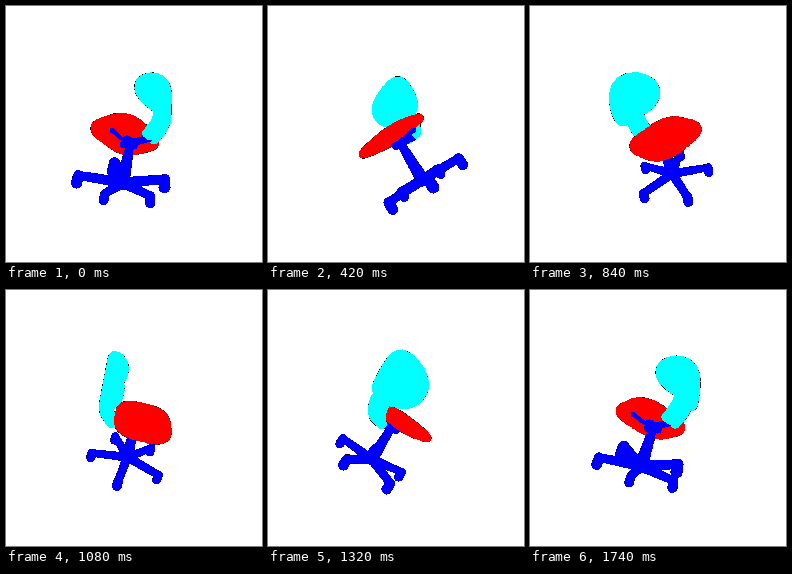
An HTML page with a canvas for the animation above (1.8 s loop, 256x256 px).

```html
<!DOCTYPE html>
<html lang="en">
<head>
<meta charset="utf-8">
<title>Turning chair</title>
<style>
html, body { margin: 0; height: 100%; overflow: hidden; background: #fff; }
canvas { display: block; width: 100vw; height: 100vh; image-rendering: pixelated; }
</style>
</head>
<body>
<canvas width="256" height="256"></canvas>
<script>
const ctx = document.querySelector('canvas').getContext('2d', { willReadFrequently: true });
const { PI, sin, cos, abs, sign, max } = Math;
const STEP = 60, STEPS = 30, FOCUS = 250;
const RED = '#f00', CYAN = '#0ff', BLUE = '#00f';

// Chair axes in space: x right, y down, z toward the viewer
const SEAT = [-8.5, 2.5, -4];
const BACK = [.83, -.23, .51], SIDE = [-.55, -.49, .67], UP = [.1, -.84, -.53];

const balls = [];
function ball(b, s, u, r, color) {
  const [x, y, z] = SEAT.map((c, i) => c + b * BACK[i] + s * SIDE[i] + u * UP[i]);
  balls.push({ x, y, z, r, color });
}

function rod(from, to, r0, r1, n = 24) {
  for (let i = 0; i <= n; i++) {
    const t = i / n, [b, s, u] = from.map((v, j) => v + (to[j] - v) * t);
    ball(b, s, u, r0 + (r1 - r0) * t, BLUE);
  }
}

function buildSeat() {
  const round = v => sign(v) * abs(v) ** (2 / 3);
  for (let q = 0; q <= 1.001; q += .1)
    for (let i = 0; i < 72; i++) {
      const a = i * PI / 36;
      ball(25.7 * q * round(cos(a)), 32 * q * round(sin(a)), 0, 6.7 - 3.4 * q ** 3, RED);
    }
}

function buildBack() {
  const mid = 35;
  for (let u = -8; u <= mid + 20; u += 1.5) {
    const power = u < mid ? 2.4 : 2;
    const wide = 26.5 * max(0, 1 - abs((u - mid) / 20.5) ** power) ** (1 / power);
    const half = max(wide, u < mid ? 6.5 : 0);
    const spine = 41.5 - 11 * (max(0, 10 - u) / 18) ** 2;
    const n = Math.ceil(half / 2);
    for (let i = -n; i <= n; i++) {
      const s = n ? half * i / n : 0;
      ball(spine - 12 * (s / 27) ** 2, s, u, 4.5, CYAN);
    }
  }
}

function buildBase() {
  const hub = [5, 1.4, -51];
  rod([7, 0, -11], hub, 3.8, 6);
  rod([-1, 0, -9], [29, 0, -10], 4, 3);
  rod([7, -6, -9], [7, 6, -9], 4, 4);
  rod([3, 0, -9], [3, 24, -8], 2, 2);
  ball(3, 24, -8, 2.6, BLUE);
  for (let i = 0; i < 5; i++) {
    const a = (72 * i - 9) * PI / 180;
    const b = hub[0] + 39.5 * cos(a), s = hub[1] + 39.5 * sin(a);
    rod(hub, [b, s, -51], 4.6, 3.6);
    rod([b, s, -51], [b, s, -58], 4.2, 4.6, 6);
  }
}

function draw(step) {
  const a = step / STEPS * 2 * PI, c = cos(a), d = sin(a);
  const seen = balls.map(({ x, y, z, r, color }) => {
    const depth = z * c - x * d, k = FOCUS / (FOCUS - depth);
    return { x: 128 + k * (x * c + z * d), y: 128 + k * y, r: k * r, depth, color };
  }).sort((p, q) => p.depth - q.depth);
  const disc = (p, r, color) => {
    ctx.fillStyle = color;
    ctx.beginPath();
    ctx.arc(p.x, p.y, r, 0, 2 * PI);
    ctx.fill();
  };
  ctx.fillStyle = '#fff';
  ctx.fillRect(0, 0, 256, 256);
  for (const p of seen) disc(p, p.r + .3, '#000');
  for (const p of seen) disc(p, p.r, p.color);

  // Hard pixel edges
  const img = ctx.getImageData(0, 0, 256, 256), px = img.data;
  for (let i = 0; i < px.length; i++) px[i] = px[i] > 127 ? 255 : 0;
  ctx.putImageData(img, 0, 0);
}

buildSeat();
buildBack();
buildBase();

let last = -1;
function tick() {
  const step = Math.floor(performance.now() / STEP) % STEPS;
  if (step !== last) draw(last = step);
  requestAnimationFrame(tick);
}
tick();
</script>
</body>
</html>
```
